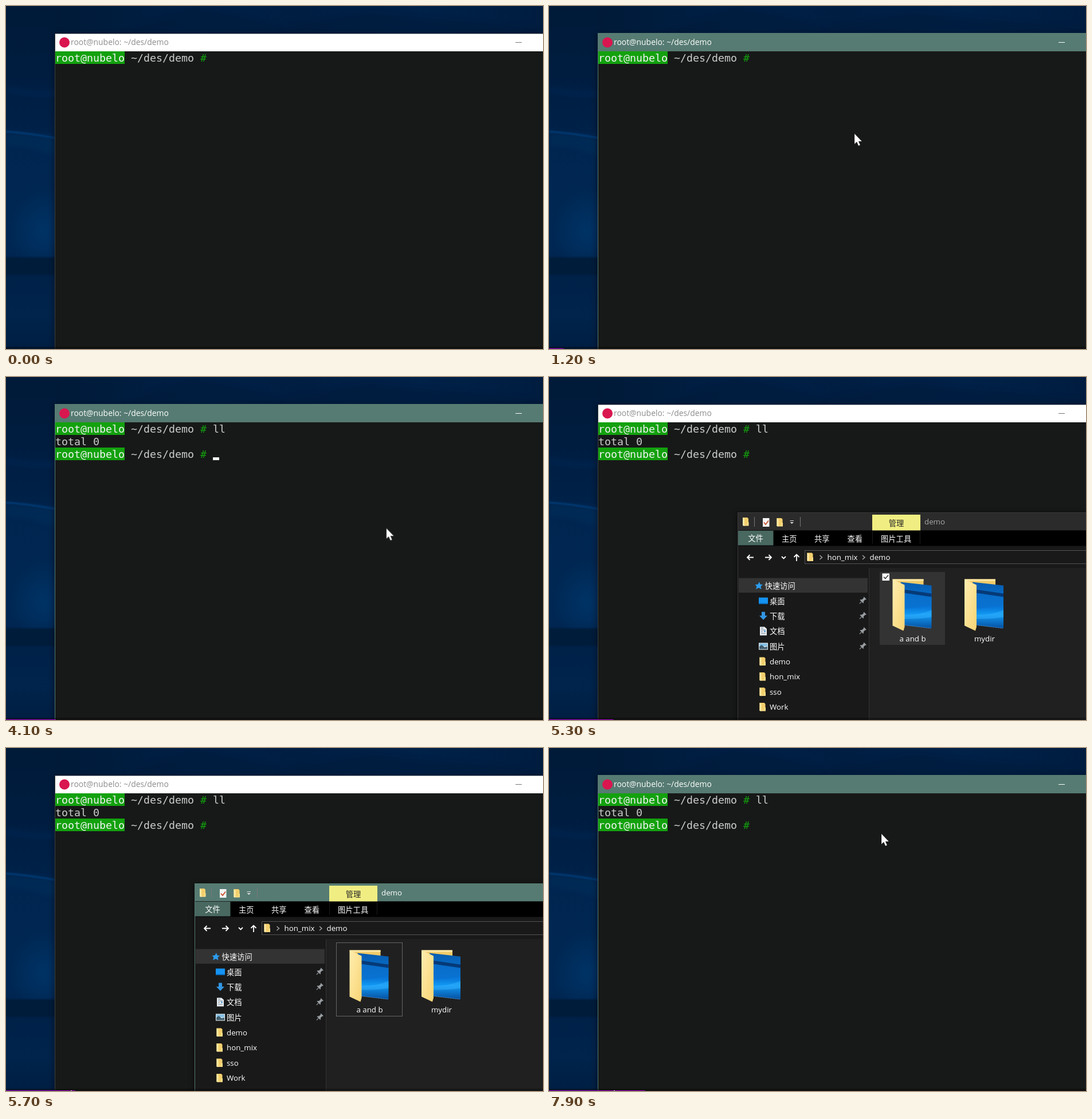
Write an HTML page that moves like this. It is 937 by 598 pixels and loops after 8000 ms.

```html
<!DOCTYPE html>
<html lang="zh-CN">
<head>
<meta charset="utf-8">
<title>Terminal and file manager</title>
<style>
html, body { margin: 0; width: 100%; height: 100%; overflow: hidden; background: #001b3a; }
svg { display: block; width: 937px; height: 598px; }
text { font-family: "Open Sans", "Noto Sans CJK SC", "Noto Sans CJK", sans-serif; }
.mono text { font: 18.27px "DejaVu Sans Mono", monospace; fill: #ccc; }
.mono .user { fill: #f4f4f4; }
.mono .hash { fill: #13a10e; }
.title { font-size: 13.9px; }
.files text { font-size: 13.3px; fill: #fff; }
.mid { text-anchor: middle; }
.line { fill: none; stroke: #fff; stroke-width: 1.8; }

/* hard changes */
.step { animation: 8s step-end infinite; }
.focus { animation-name: focus; }
.blur { animation-name: blur; }
.key1 { animation-name: key1; }
.key2 { animation-name: key2; }
.output { animation-name: output; }
.caret { animation-name: caret; }
.files { animation-name: files; }
.picked { animation-name: picked; }
.front { animation-name: front; }
.dot { animation-name: dot; }
@keyframes focus { 0%, 61.25% { visibility: hidden } 13.75%, 95%, 100% { visibility: visible } }
@keyframes blur { 0%, 61.25% { visibility: visible } 13.75%, 95%, 100% { visibility: hidden } }
@keyframes key1 { 0% { visibility: hidden } 26.25%, 100% { visibility: visible } }
@keyframes key2 { 0% { visibility: hidden } 28.75%, 100% { visibility: visible } }
@keyframes output { 0% { visibility: hidden } 37.5%, 100% { visibility: visible } }
@keyframes caret {
  0%, 22.5% { opacity: 0; transform: none }
  16.25% { opacity: 1; transform: none }
  26.25% { opacity: 1; transform: translate(11px, 0) }
  28.75% { opacity: 1; transform: translate(22px, 0) }
  33.75% { opacity: 0; transform: translate(22px, 0) }
  37.5%, 50% { opacity: 1; transform: translate(0, 44px) }
  43.75%, 56.25%, 100% { opacity: 0; transform: translate(0, 44px) }
}
@keyframes files { 0%, 95%, 100% { opacity: 0 } 61.25% { opacity: 1 } }
@keyframes picked { 0% { visibility: visible } 70%, 100% { visibility: hidden } }
@keyframes front { 0% { visibility: hidden } 70%, 100% { visibility: visible } }
@keyframes dot { 0% { visibility: hidden } 67.5%, 100% { visibility: visible } }

/* continuous motion */
.mouse { animation: mouse 8s linear infinite; }
@keyframes mouse {
  0%, 3.75% { transform: translate(330px, 610px) }
  10%, 46.25% { transform: translate(533px, 223px) }
  51.25% { transform: translate(663px, 264px) }
  56.25% { transform: translate(945px, 350px) }
  56.26%, 81.25% { transform: translate(789px, 605px) }
  87.5%, 100% { transform: translate(580px, 150px) }
}
.progress { animation: progress 8s steps(80) infinite; }
@keyframes progress { from { transform: translateX(-169.6px) } to { transform: none } }
</style>
</head>
<body>
<svg viewBox="0 0 937 598">
  <defs>
    <linearGradient id="side" x2="0" y2="1">
      <stop offset="0" stop-color="#001a38"/><stop offset=".2" stop-color="#001d40"/>
      <stop offset=".36" stop-color="#002148"/><stop offset=".4" stop-color="#002650"/>
      <stop offset=".7" stop-color="#002753"/><stop offset=".79" stop-color="#002148"/>
      <stop offset=".9" stop-color="#00244c"/><stop offset="1" stop-color="#001e42"/>
    </linearGradient>
    <linearGradient id="top">
      <stop offset="0" stop-color="#001a38"/><stop offset=".3" stop-color="#002046"/>
      <stop offset=".5" stop-color="#001e42"/><stop offset=".75" stop-color="#002148"/>
      <stop offset="1" stop-color="#001d40"/>
    </linearGradient>
    <linearGradient id="gold" x2="1" y2="1">
      <stop offset="0" stop-color="#ffeeb0"/><stop offset="1" stop-color="#f8d474"/>
    </linearGradient>
    <linearGradient id="sky" x2="0" y2="1">
      <stop offset="0" stop-color="#075cae"/><stop offset=".55" stop-color="#0878da"/>
      <stop offset=".7" stop-color="#129af4"/><stop offset="1" stop-color="#064f9f"/>
    </linearGradient>
    <radialGradient id="glow">
      <stop offset="0" stop-color="#003f78" stop-opacity=".5"/>
      <stop offset="1" stop-color="#003f78" stop-opacity="0"/>
    </radialGradient>
    <filter id="soft" x="-50%" y="-50%" width="200%" height="200%"><feGaussianBlur stdDeviation="1.3"/></filter>
    <filter id="shade" x="-10%" y="-10%" width="120%" height="120%"><feGaussianBlur stdDeviation="5"/></filter>

    <g id="mini">
      <path d="M0 0H8L10 2V14H0z" fill="#f3cf6c"/>
      <path d="M0 0L3 2V15L0 14z" fill="#ffeaa5"/>
      <path d="M8 8H10.500V14.500H3V13H8z" fill="#ffe08a"/>
    </g>
    <g id="folder">
      <path d="M0 0H54V75H10z" fill="#f0cb69"/>
      <path d="M0 0H54V3H5z" fill="#ffe9a8"/>
      <path d="M14 5L68 11V86L19 80z" fill="url(#sky)"/>
      <path d="M20 18L68 25V31L20 24z" fill="#053a78"/>
      <path d="M20 24L68 31V46L20 52z" fill="#0b70cd" opacity=".6"/>
      <path d="M20 62Q45 63 68 54V66Q45 70 20 69z" fill="#38b4ff" opacity=".45"/>
      <path d="M20 80L67 85.500" stroke="#8ac8ef" stroke-dasharray="1 2" fill="none"/>
      <path d="M0 0L21 10V83L19 90L0 81z" fill="url(#gold)"/>
    </g>
    <g id="pin" transform="rotate(45)" fill="#9a9ea2">
      <path d="M-3 -6H3V-4.500H2V0L4 2V3H-4V2L-2 0V-4.500H-3z"/><path d="M-.6 3H.6V8H-.6z"/>
    </g>
    <path id="next" d="M-2 -3.500L2 0L-2 3.500" fill="none" stroke="#a5a5a5" stroke-width="1.5"/>
    <g id="prompt" class="mono">
      <rect x="86" y="79" width="121" height="22" fill="#13a10e"/>
      <text class="user" x="86" y="97">root@nubelo</text>
      <text x="218" y="97">~/des/demo</text>
      <text class="hash" x="339" y="97">#</text>
    </g>
  </defs>

  <!-- wallpaper -->
  <rect width="937" height="598" fill="url(#side)"/>
  <rect x="86" width="851" height="48" fill="url(#top)"/>
  <path d="M330 0L480 38L640 12L937 40V48H200z" fill="#001733" opacity=".3" filter="url(#shade)"/>
  <path d="M0 140Q45 150 86 146V158Q40 160 0 152z" fill="#002c5c" opacity=".4" filter="url(#shade)"/>
  <path d="M0 218Q45 221 86 229V262Q40 240 0 242z" fill="#00305f" opacity=".4" filter="url(#shade)"/>
  <path d="M0 219Q35 221 86 230" fill="none" stroke="#043a74" stroke-width="3" filter="url(#soft)"/>
  <ellipse cx="65" cy="392" rx="60" ry="75" fill="url(#glow)"/>
  <rect x="-5" y="438" width="100" height="31" fill="#001a3a" filter="url(#soft)"/>
  <rect x="82" y="49" width="860" height="560" fill="#000" opacity=".3" filter="url(#shade)"/>

  <!-- terminal -->
  <rect x="85" y="48" width="852" height="550" fill="#3b403f"/>
  <rect x="86" y="79" width="851" height="519" fill="#171918"/>
  <g class="step blur">
    <rect x="86" y="48.500" width="851" height="30.500" fill="#fff"/>
    <text class="title" x="113" y="68" fill="#8c8c8c">root@nubelo: ~/des/demo</text>
    <path d="M889 63.500H900" stroke="#777"/>
  </g>
  <g class="step focus">
    <rect x="85" y="47" width="852" height="32" fill="#567b72"/>
    <path d="M85.500 79V598" stroke="#567b72"/>
    <text class="title" x="113" y="68" fill="#fff">root@nubelo: ~/des/demo</text>
    <path d="M889 63.500H900" stroke="#fff"/>
  </g>
  <circle cx="102" cy="63.500" r="9" fill="#d9164f"/>
  <g class="mono">
    <use href="#prompt"/>
    <text class="step key1" x="361" y="97">l</text>
    <text class="step key2" x="372" y="97">l</text>
    <g class="step output">
      <text x="86" y="119">total 0</text>
      <use href="#prompt" y="44"/>
    </g>
    <rect class="step caret" x="361" y="96" width="11" height="5" fill="#f2f2f2"/>
  </g>

  <!-- file manager -->
  <g class="step files">
    <rect x="327" y="236" width="620" height="370" fill="#000" opacity=".4" filter="url(#shade)"/>
    <rect x="329" y="236" width="608" height="362" fill="#191919"/>
    <rect x="329" y="236" width="608" height="31.500" fill="#2b2b2b"/>
    <path d="M329.500 236V598M329 236.500H937" stroke="#3a3a3a" fill="none"/>
    <g class="step front">
      <rect x="329" y="236" width="608" height="31.500" fill="#567b72"/>
      <path d="M329.500 267V598" stroke="#567b72"/>
    </g>
    <use href="#mini" x="338" y="245"/>
    <use href="#mini" x="397.500" y="246"/>
    <path d="M358.500 244V261M438.500 244V261" stroke="#777"/>
    <path d="M373 246H384.500V261H373z" fill="#f5f5f5"/>
    <path d="M375 253.500L378 257L383 250.500" fill="none" stroke="#c7502c" stroke-width="1.8"/>
    <path d="M420.500 250.500H427" stroke="#ddd"/>
    <path d="M420.500 253H427L423.750 256z" fill="#ddd"/>
    <rect x="564" y="240" width="84" height="28" fill="#f0ee82"/>
    <text class="mid" x="606" y="260" style="fill:#222">管理</text>
    <text class="step picked" x="655" y="257" style="fill:#aaa">demo</text>
    <text class="step front" x="655" y="257">demo</text>

    <rect x="330" y="267.500" width="607" height="27" fill="#000"/>
    <rect x="330" y="268" width="61.500" height="25.500" fill="#486860"/>
    <path d="M564.500 268V291M647.500 268V291" stroke="#1b1b1b"/>
    <text class="mid" x="360.500" y="286">文件</text>
    <text x="406" y="287">主页</text>
    <text x="463" y="287">共享</text>
    <text x="520.500" y="287">查看</text>
    <text x="579" y="287">图片工具</text>

    <path class="line" d="M357 314.500H346M350.500 310L346 314.500L350.500 319M377 314.500H388M383.500 310L388 314.500L383.500 319M432 321V309.500M427.500 314L432 309.500L436.500 314M406 313L409.500 316.500L413 313"/>
    <rect x="446.500" y="302.500" width="500" height="23" fill="#191919" stroke="#535353"/>
    <use href="#mini" x="450.500" y="306.500"/>
    <use href="#next" x="474.500" y="314.500"/>
    <text x="485.500" y="319">hon_mix</text>
    <use href="#next" x="549" y="314.500"/>
    <text x="559.500" y="319">demo</text>

    <rect x="558" y="333" width="379" height="265" fill="#202020"/>
    <path d="M558.500 333V598" stroke="#343434"/>
    <rect x="331" y="350.500" width="225" height="25.500" fill="#333"/>
    <path d="M367 357L368.500 361.500L373 362L369.500 365L370.500 370L366 367.500L361 370L362.500 365L359.500 362L364.500 361.500z" fill="#2d9df0"/>
    <text x="376.500" y="368.500">快速访问</text>

    <rect x="366" y="384.500" width="16" height="11.500" fill="#1593f2"/>
    <path d="M366 395H382" stroke="#0764b2" stroke-width="1.5"/>
    <path d="M371 409.500H377V416H381L374 423.500L367 416H371z" fill="#3296e4"/>
    <path d="M368 435.500H376L380 439V450.500H368z" fill="#eceff2"/>
    <path d="M370 438H374M370 441H378M370 444H373M370 447H378" stroke="#657c91"/>
    <path d="M375 443.500H378" stroke="#3489ca" stroke-width="2"/>
    <rect x="366" y="463.500" width="16" height="12" fill="#edf3f6"/>
    <rect x="367" y="464.500" width="14" height="5" fill="#83bfe6"/>
    <path d="M367 470L371 467L376 471L381 470V474.500H367z" fill="#415f70"/>
    <text x="385" y="395.500">桌面</text>
    <text x="385" y="422">下载</text>
    <text x="385" y="448">文档</text>
    <text x="385" y="474.500">图片</text>
    <use href="#pin" x="547.500" y="389.500"/>
    <use href="#pin" x="547.500" y="416"/>
    <use href="#pin" x="547.500" y="442.500"/>
    <use href="#pin" x="547.500" y="469"/>
    <use href="#mini" x="367.500" y="488.500"/>
    <use href="#mini" x="367.500" y="515"/>
    <use href="#mini" x="367.500" y="541.500"/>
    <use href="#mini" x="367.500" y="568"/>
    <text x="385" y="500.500">demo</text>
    <text x="385" y="527">hon_mix</text>
    <text x="385" y="553.500">sso</text>
    <text x="385" y="580">Work</text>

    <rect class="step picked" x="577" y="340" width="114" height="127" fill="#333"/>
    <rect class="step front" x="576.500" y="339.500" width="115" height="128" fill="none" stroke="#666"/>
    <use href="#folder" x="599.500" y="352.500"/>
    <use href="#folder" x="725" y="352.500"/>
    <g class="step picked">
      <rect x="581.500" y="342.500" width="12.500" height="12.500" fill="#fff"/>
      <path d="M584 348.500L586.800 351.500L592 345.500" fill="none" stroke="#222" stroke-width="1.3"/>
    </g>
    <text class="mid" x="634.500" y="461">a and b</text>
    <text class="mid" x="760" y="461">mydir</text>
  </g>

  <!-- bottom edge -->
  <rect y="594" width="937" height="4" fill="#000" opacity=".3"/>
  <rect class="progress" y="597" width="169.600" height="1" fill="#b000d0"/>
  <rect class="step dot" x="113" y="597" width="2" height="1" fill="#eee"/>

  <path class="mouse" d="M0 -.5V17.800L4 14L7 20.700L10 19.400L7.200 13H13z" fill="#fff" stroke="#111" stroke-width=".3"/>
</svg>
</body>
</html>
```
